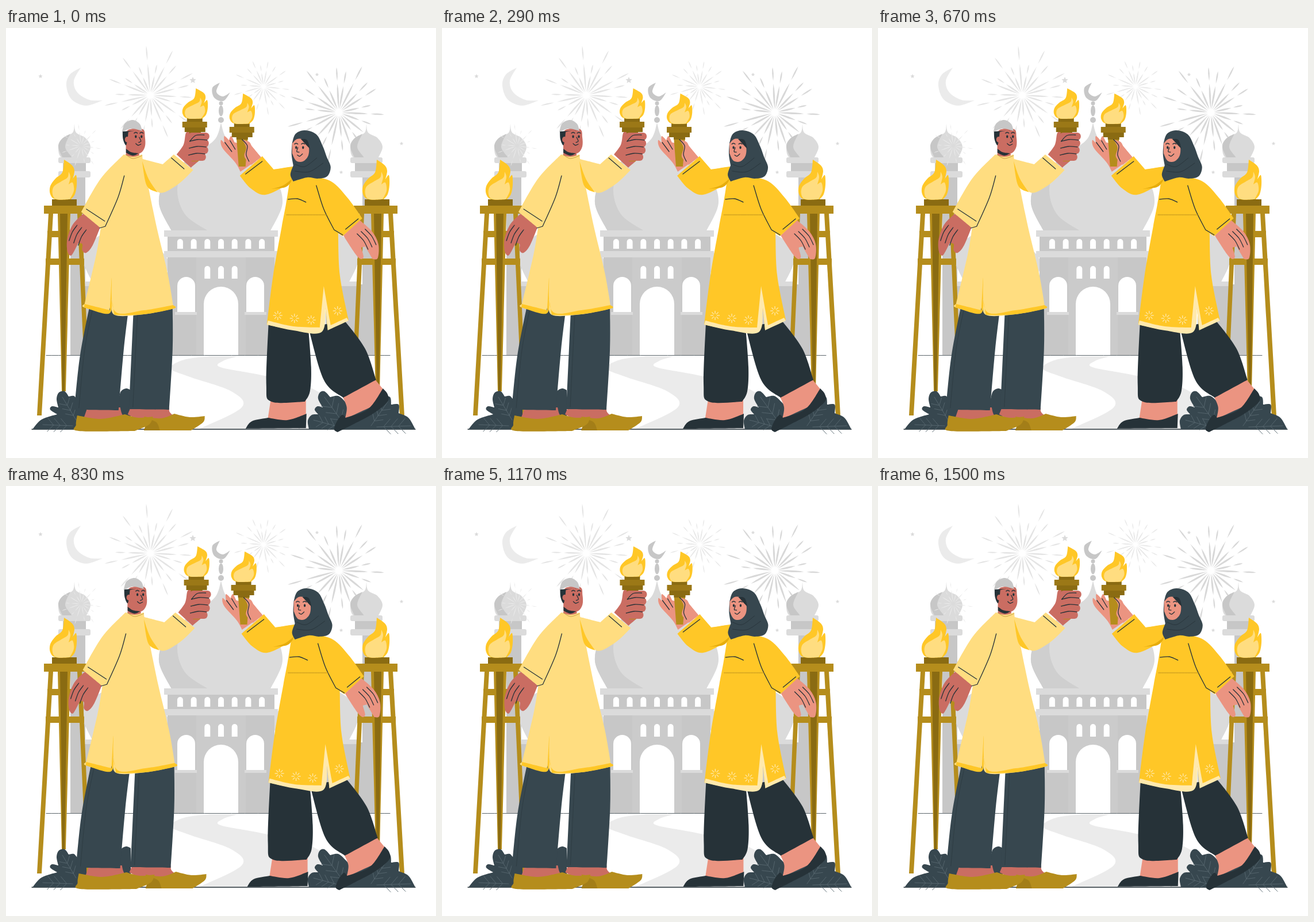
An HTML page for the animation above (1540 ms loop, 748 px wide and 748 px high).

```html
<!DOCTYPE html>
<html lang="en">
<head>
<meta charset="utf-8">
<title>Torch greeting</title>
<style>
  html, body { margin: 0; width: 100%; height: 100%; overflow: hidden; background: #fff; }
  svg { display: block; width: 100vw; height: 100vh; }
</style>
</head>
<body>
<svg id="stage" viewBox="0 0 748 748" preserveAspectRatio="none"></svg>
<script>
const GOLD = '#b58d1c', BRONZE = '#8a6b12', SUN = '#ffc727', CREAM = '#ffdd80', TRIM = '#ffe9ad',
  SLATE = '#37474f', NIGHT = '#263238', TAN = '#ca6d62', ROSE = '#eb9481',
  GREY = '#c7c7c7', PALE = '#dbdbdb', MIST = '#ebebeb', WHITE = '#fff';

let seed = 11;
const rand = () => (seed = seed * 16807 % 2147483647) / 2147483647;
const repeat = (n, f) => Array.from({ length: n }, (_, i) => f(i)).join('');

// Smooth runs through "x,y" points; a slash marks a corner.
function curve(text) {
  let d = '', last = null;
  for (const run of text.split('/')) {
    const pts = run.trim().split(' ').map(p => p.split(',').map(Number));
    if (last) pts.unshift(last); else d = 'M' + pts[0];
    for (let i = 1; i < pts.length; i++) {
      const b = pts[i - 1], c = pts[i], a = pts[i - 2] || b, e = pts[i + 1] || c;
      d += `C${b.map((v, k) => v + (c[k] - a[k]) / 6)} ${c.map((v, k) => v - (e[k] - b[k]) / 6)} ${c}`;
    }
    last = pts.at(-1);
  }
  return d;
}

const fill = (color, text) => `<path fill="${color}" d="${curve(text)}Z"/>`;
const line = (text, color = NIGHT, w = 1.3) =>
  `<path fill="none" stroke="${color}" stroke-width="${w}" stroke-linecap="round" d="${curve(text)}"/>`;
const rect = (color, x, y, w, h, r = 0) =>
  `<rect fill="${color}" x="${x}" y="${y}" width="${w}" height="${h}" rx="${r}"/>`;
const oval = (color, x, y, rx, ry = rx) => `<ellipse fill="${color}" cx="${x}" cy="${y}" rx="${rx}" ry="${ry}"/>`;
const place = (x, y, s, sx = 1, sy = 1) => `<g transform="translate(${x} ${y}) scale(${sx} ${sy})">${s}</g>`;
const twin = s => s + place(747, 0, s, -1);

// Background
function lens(r0, r1, w) {
  const m = r0 + (r1 - r0) * .6;
  return `M${r0} 0Q${m} ${w} ${r1} 0Q${m} ${-w} ${r0} 0Z`;
}

function burst(x, y, r, n, color, w) {
  return repeat(n, i => {
    const len = r * (i % 2 ? .6 + rand() * .2 : .82 + rand() * .18);
    const turn = (i + rand() * .4) * 360 / n;
    return `<path fill="${color}" transform="translate(${x} ${y}) rotate(${turn})"
      d="${lens(r * .06, len * .64, w)}${lens(len * .7, len, w * .8)}"/>`;
  });
}

function star(x, y, r) {
  const pts = Array.from({ length: 10 }, (_, i) => {
    const q = i % 2 ? r * .45 : r, a = i * Math.PI / 5;
    return [x + q * Math.sin(a), y - q * Math.cos(a)];
  });
  return `<polygon fill="${PALE}" points="${pts.join(' ')}"/>`;
}

const arch = (x, y, w, bottom, color = WHITE) =>
  `<path fill="${color}" d="M${x - w / 2} ${bottom}V${y + w / 2}a${w / 2} ${w / 2} 0 0 1 ${w} 0V${bottom}Z"/>`;
const arches = (n, y, bottom) => repeat(n, i => arch(374 + (i - (n - 1) / 2) * 23.7, y, 10, bottom));

const sky = burst(251, 117, 88, 22, '#e4e4e4', 2.8) + burst(448, 102, 54, 18, '#e8e8e8', 2) +
  burst(579, 147, 94, 22, '#d8d8d8', 3.2) +
  star(60, 84, 4) + star(325, 91, 6) + star(541, 81, 3.5) + star(688, 201, 3.5) + star(583, 251, 3.5) +
  fill(MIST, '130,69 111,81 105,100 114,124 139,135 168,126 / 145,125 124,112 118,92 130,69');

const minaret = rect(GREY, 112, 260, 26, 310) +
  fill(PALE, '119,167 122,182 138,191 147,207 139,227 / 99,227 91,207 100,191 116,182 119,167') +
  fill(GREY, '112,184 97,193 91,207 99,227 / 115,227 103,207 112,184') +
  rect(GREY, 99, 234, 40, 16) + rect(PALE, 91, 225, 56, 10, 3) + rect(PALE, 91, 249, 56, 11, 3);

const wing = fill(PALE, '208,337 150,370 134,402 150,442 / 270,442 / 280,400 208,337') +
  rect(GREY, 113, 446, 172, 124) + rect(PALE, 134, 441, 151, 8) + arch(211, 470, 40, 570);

const mosque =
  fill(PALE, '374,165 384,193 415,217 465,258 481,304 460,353 / 288,353 / 266,304 282,258 333,217 364,193 374,165') +
  fill('#cfcfcf', '333,217 282,258 266,304 288,353 / 350,352 / 312,325 298,285 308,248 333,217') +
  fill(GREY, '372,95 359,104 362,121 378,127 390,112 / 377,119 366,111 372,95') +
  oval(GREY, 374, 131, 3.5) + oval(GREY, 374, 144, 4, 9.5) + oval(GREY, 374, 160, 5) +
  rect(GREY, 281, 360, 186, 210) + rect('#cbcbcb', 331, 399, 86, 171) +
  rect(PALE, 275, 352, 198, 11) + rect(PALE, 275, 388, 198, 11) +
  twin(rect(PALE, 294, 494, 38, 5) + arch(313.5, 433, 31, 494)) +
  arches(7, 367, 384) + arches(3, 414, 436) + arch(374, 450, 60, 570);

const ground =
  fill(MIST, '355,571 310,577 286,592 320,607 392,632 410,660 335,698 / 545,698 / 570,660 530,626 450,605 373,590 378,579 404,571') +
  line('70,569.5 / 668,569.5', '#5c666b', 1) + line('45,698 / 712,698');

// Bushes and fire stands
function vein(x, y, x2, y2) {
  const dx = x2 - x, dy = y2 - y;
  const rib = (k, s) => line(`${x + dx * k},${y + dy * k} ${x + dx * (k + .2) + dy * s},${y + dy * (k + .2) - dx * s}`, '#56666e', 1);
  return line(`${x},${y} ${x2},${y2}`, '#56666e', 1) + repeat(3, i => rib(.2 + i * .22, .22) + rib(.2 + i * .22, -.22));
}

const bushes =
  fill(SLATE, '46,698 62,681 89,672 / 77,664 80,658 91,660 / 88,645 92,634 102,632 109,641 / 118,640 126,648 140,655 / 140,698') +
  fill(SLATE, '175,698 / 175,650 186,641 196,645 / 200,632 209,627 217,630 / 217,698') +
  fill(SLATE, '527,698 525,683 532,673 543,672 / 537,664 542,658 551,660 / 543,645 546,634 554,632 564,642 / 578,640 590,650 597,658 / 655,640 / 668,642 670,655 / 683,655 683,670 / 700,678 712,698') +
  vein(116, 692, 64, 690) + vein(122, 682, 98, 642) + vein(590, 692, 554, 642) +
  vein(580, 694, 535, 682) + vein(635, 692, 664, 650) + vein(645, 694, 704, 692);

const flame = fill(SUN, '25,0 39,10 43,20 40,34 / 46,27 47,44 44,60 37,69 / 10,69 1,60 1,46 10,33 22,22 25,0') +
  fill(CREAM, '33,21 36,30 33,43 / 40,40 42,54 35,69 / 12,69 5,60 7,47 20,38 31,31 33,21');

const stand = fill(GOLD, '74,323 / 82,323 / 62,674 / 54,674') + fill(GOLD, '124,323 / 132,323 / 147,674 / 140,674') +
  rect(GOLD, 72, 353, 62, 11) + rect(GOLD, 69, 401, 67, 11) +
  fill(GOLD, '90,323 / 112,323 / 104,632 / 97,632') + fill(BRONZE, '94,323 / 107,323 / 102,632 / 98,632') +
  rect(BRONZE, 80, 298, 43, 12) + rect(GOLD, 66, 309, 76, 14);

const torch = fill(GOLD, '12,23 / 32,23 / 28,75 / 16,75') + rect(BRONZE, 12, 23, 20, 5) +
  rect(BRONZE, 8, 0, 27, 6) + rect('#9b7817', 0, 6, 43, 10) + rect(BRONZE, 4, 16, 36, 8) +
  place(0, -52, flame, .94, .76);

// People
const strokes = (n, x, y, sx, sy) => repeat(n, i =>
  line(`${x + i * sx},${y + i * 4} ${x + i * sx + sy * .6},${y + 12 + i * 4} ${x + i * sx + sy},${y + 27 + i * 4}`));
const eyes = (x, x2, y) => [x, x2].map(e =>
  oval(NIGHT, e, y, 1.7, 2.4) + line(`${e - 3},${y - 6} ${e},${y - 7.5} ${e + 3},${y - 6}`)).join('');

const man =
  fill(TAN, '142,660 / 199,660 / 203,673 214,680 / 170,690 / 135,680') +
  fill(TAN, '217,660 / 284,660 / 285,668 293,676 / 245,690 / 212,672') +
  fill(GOLD, '240,676 / 270,679 293,671 / 320,677 346,675 / 343,686 322,700 / 250,700') +
  fill('#a37e18', '247,680 262,686 268,700 / 240,700') +
  fill(GOLD, '124,674 165,680 207,672 / 230,678 256,676 / 249,690 224,701 / 127,701 122,690 124,674') +
  fill(SLATE, '146,482 / 213,492 / 205,560 196,665 / 119,664 / 129,570 146,482') +
  fill(SLATE, '222,492 / 290,482 / 290,560 284,664 / 214,663') +
  line('151,488 137,560 127,661', '#2c3a41', .8) + line('229,497 221,659', '#2c3a41', .8) +
  fill(TAN, '136,322 117,341 107,366 107,388 113,396 119,388 / 126,374 / 133,376 133,387 140,391 151,378 164,347') +
  strokes(3, 124, 343, 8, -14) +
  fill(TAN, '297,220 309,203 313,183 319,181 / 345,183 / 349,215 322,243') +
  place(307, 157, torch) +
  repeat(4, i => rect(TAN, 317 + (i % 3), 182 + i * 12, 37 - i * 2, 13, 6)) +
  repeat(3, i => line(`${320 - i},${197 + i * 12} ${334 - i},${194 + i * 12} ${350 - i * 2},${195 + i * 12}`)) +
  line('345,186 330,187 320,197') +
  rect(TAN, 209, 190, 23, 34) +
  fill(CREAM, '205,220 165,262 131,320 / 165,348 / 157,395 137,480 / 136,486 179,497 / 184,471 / 189,499 240,498 292,488 / 281,425 262,345 247,272 / 260,283 275,286 302,270 326,247 / 292,220 / 273,237 / 238,228 / 237,220 / 221,224 205,220') +
  fill(SUN, '137,480 181,491 / 184,434 / 190,493 240,491 291,482 / 292,488 240,498 189,499 / 184,471 / 179,497 136,486') +
  fill(SUN, '237,231 248,262 264,286 / 245,274 237,231') +
  line('206,257 195,295 173,345 / 163,348') + line('140,315 / 172,336') + line('288,226 / 310,245') +
  line('208,220 221,227 237,222', '#b88f38', .8) +
  fill(TAN, '209,190 213,177 238,176 242,190 242,206 235,217 221,219 209,211') +
  fill(NIGHT, '209,210 218,216 231,218 / 221,222 209,217') +
  fill(NIGHT, '203,180 / 237,178 / 222,179 213,181 / 212,192 / 209,204 204,194 203,180') +
  fill(GREY, '202,181 207,166 221,160 233,167 237,179 / 218,175 202,181') +
  oval(TAN, 211, 194, 4, 5) + eyes(226, 236, 189) + line('232,190 235,197 231,199') + line('226,201 230,204 235,202');

const bloom = repeat(8, i => `<path transform="rotate(${i * 45})" d="M0-8V-3" stroke="${TRIM}" stroke-width="1.3"/>`);

const woman =
  fill(ROSE, '461,645 / 522,645 / 522,684 / 455,684') +
  fill(ROSE, '586,642 / 641,610 / 657,629 / 638,658 / 590,680 / 593,660 586,642') +
  fill(NIGHT, '417,697 428,684 456,678 / 490,682 523,671 / 522,696 / 417,697') +
  fill(NIGHT, '656,627 664,637 664,650 640,670 605,689 577,703 / 571,698 576,684 585,673 591,678 / 630,663 656,627') +
  fill(NIGHT, '457,512 / 526,520 / 531,590 529,632 520,650 / 462,650 453,620 457,512') +
  fill(NIGHT, '526,520 / 590,510 / 625,558 644,612 / 587,643 / 553,612 526,520') +
  fill(ROSE, '615,334 637,354 648,376 647,400 638,402 / 625,380 / 618,382 / 622,399 612,398 587,361') +
  strokes(3, 625, 350, -7, 19) +
  fill(ROSE, '408,250 399,234 377,209 374,195 380,200 / 380,188 388,195 / 392,188 398,199 / 428,206 / 444,225') +
  place(389, 166, torch) +
  fill(ROSE, '411,194 423,198 429,207 444,225 / 427,238 / 415,224 418,208 411,194') +
  line('411,194 420,205 418,220 423,232') + line('381,199 / 393,215') + line('390,196 / 399,211') +
  fill(SUN, '498,241 / 466,246 / 446,223 / 407,257 / 426,279 452,290 493,271 / 487,308 480,345 465,430 454,516 / 500,525 549,528 / 556,487 / 560,525 / 596,508 / 581,430 578,357 / 586,362 / 620,331 / 594,295 566,267 530,257') +
  fill(TRIM, '456,509 500,519 546,521 / 553,449 / 565,517 / 593,504 / 596,509 / 560,526 / 556,487 / 549,529 500,526 454,516') +
  fill('#e7ad0c', '498,262 482,274 462,280 / 486,277 496,268') +
  line('540,274 553,315 571,351 / 586,360') + line('417,254 / 446,232') + line('591,350 / 613,332') +
  line('491,298 507,297 522,303') + line('488,325 / 558,325', GOLD, .9) +
  place(473, 500, bloom) + place(502, 505, bloom) + place(531, 508, bloom) + place(577, 492, bloom) +
  fill(SLATE, '498,200 504,184 520,178 540,185 551,205 558,224 565,242 559,258 542,262 524,260 500,267 / 495,255 500,239 / 497,220 498,200') +
  fill(ROSE, '498,201 507,193 521,195 527,206 526,222 517,232 505,231 498,218') +
  fill(NIGHT, '513,193 524,195 529,210 / 523,204 513,193') +
  eyes(505, 517, 208) + line('508,208 506,215 510,216') + line('507,221 511,223 516,219') +
  line('503,237 520,241 541,226', NIGHT, .8) + line('503,249 528,250 552,235', NIGHT, .8);

const stage = document.getElementById('stage');
stage.innerHTML = sky + minaret + place(508, 0, minaret) + twin(wing) +
  burst(131, 205, 40, 14, '#e9e9e9', 1.3) + mosque + ground + twin(stand) +
  place(76, 229, flame) + place(620, 229, flame) + bushes + `<g id="people">${man}${woman}</g>`;
const people = document.getElementById('people');

// The shake has ten linear parts and reads the same both ways.
const LOOP = 1540, CYCLE = 1500, STEP = 1000 / 24, LEAD = 24, UNIT = 1.5;

function pose(i) {
  const k = Math.min(i, 10 - i);
  return k > 2 ? (i % 2 ? -4 : 4) : [0, -1, 2][k];
}

function shake(ms) {
  const p = ms % CYCLE / CYCLE * 10, i = Math.floor(p);
  return UNIT * (pose(i) + (pose(i + 1) - pose(i)) * (p - i));
}

function draw(ms) {
  const step = Math.min(36, Math.floor((ms % LOOP + 4) / STEP));
  people.setAttribute('transform', `translate(${shake(step * STEP + LEAD).toFixed(2)} 0)`);
}

const start = performance.now();
function tick() {
  draw(performance.now() - start);
  requestAnimationFrame(tick);
}
tick();
</script>
</body>
</html>
```
